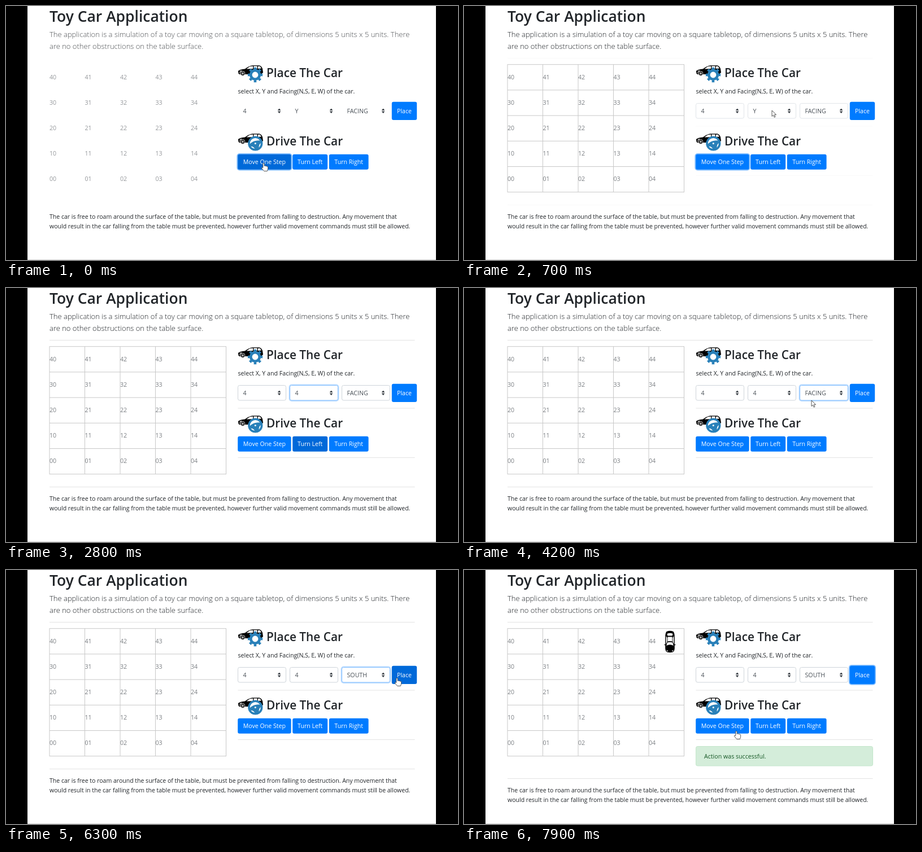
An HTML page for the animation above (8 s loop, 800x450 px).

```html
<!DOCTYPE html>
<html lang="en">
<head>
<meta charset="utf-8">
<title>Toy Car Application</title>
<style>
  html, body { margin: 0; width: 100%; height: 100%; overflow: hidden; background: #000; }
  svg { display: block; width: 800px; height: 450px; }
  text { font-family: "Open Sans", "Noto Sans", sans-serif; font-size: 10.65px; fill: #212529; white-space: pre; }
  .title { font-weight: 600; font-size: 26.45px; }
  .head { font-weight: 600; font-size: 20.8px; }
  .lead { font-weight: 300; font-size: 13px; }
  .note { font-size: 10.53px; }
  .cell { fill: #7b7f83; }
  .value { fill: #495057; }
  .label { fill: #fff; font-size: 10.6px; text-anchor: middle; }
  .rule { stroke: #e3e3e3; }
  .grid { stroke: #c8c8c8; fill: none; }
</style>
</head>
<body>
<svg id="stage" viewBox="0 0 800 450" xmlns="http://www.w3.org/2000/svg"></svg>
<script>
const LOOP = 8000, STEP = 100;
const BLUE = [0, 123, 255], DARK = [0, 105, 217];
const stage = document.getElementById('stage');
const $ = id => document.getElementById(id);

const text = (x, y, cls, str, id = '') =>
  `<text ${id && `id="${id}"`} class="${cls}" x="${x}" y="${y}">${str}</text>`;
const rule = (x, y) => `<path class="rule" d="M${x} ${y}H723.5"/>`;
const box = (x, y, w, h, attrs) =>
  `<rect x="${x}" y="${y}" width="${w}" height="${h}" ${attrs}/>`;

const button = (id, x, y, w, h, label) =>
  box(x - .8, y - .8, w + 1.6, h + 1.6, `id="${id}Ring" rx="4" fill="none" stroke="#80bdff" stroke-width="2"`) +
  box(x, y, w, h, `id="${id}" rx="3"`) +
  text(x + w / 2, y + h / 2 + 4, 'label', label);

const select = (id, x) =>
  box(x - 1, 171.5, 87, 28.5, `id="${id}Ring" rx="4" fill="none" stroke="#bfdeff" stroke-width="2"`) +
  box(x, 172.5, 85, 26.5, `id="${id}" rx="3" fill="#fff"`) +
  `<path fill="#343a40" d="M${x + 70.3} 185l2.8-3.6 2.8 3.6zM${x + 70.3} 186.6l2.8 3.6 2.8-3.6z"/>` +
  text(x + 9, 190, 'value', '', id + 'Value');

function table() {
  const left = 77, top = 103.7, colW = 62.5, rowH = 45.2;
  let lines = '', cells = '';
  for (let i = 1; i < 5; i++)
    lines += `M${left + i * colW} ${top}v${5 * rowH}M${left} ${top + i * rowH}h${5 * colW}`;
  for (let row = 0; row < 5; row++)
    for (let col = 0; col < 5; col++)
      cells += text(left + col * colW, 129.5 + row * rowH, 'cell', `${4 - row}${col}`);
  return `<g id="lines" class="grid">${box(left, top, 5 * colW, 5 * rowH, '')}<path d="${lines}"/></g><g id="cells">${cells}</g>`;
}

const sideCar = y => `<g transform="translate(411 ${y})">
  <path d="M0 10Q3 7.2 12 6.500Q19 1 25 .3H37Q41 .8 43 6L44 13L40 16H3Q0 15.500 0 13Z"/>
  <path fill="#fff" d="M14.500 6.600L20.500 2.300L26 1.600V6.300ZM27.300 1.600H33.700V6L27.300 6.300ZM35 1.700H38.500L41 5.600L35 6ZM2 10.200l5-1.200-2.500 2.400zM.8 12.800h3.500v.8H.8z"/>
  <circle cx="8" cy="14.500" r="3.900" stroke="#fff" stroke-width=".8"/><circle cx="8" cy="14.500" r="2" fill="#aaa"/></g>`;

const gear = `<g transform="translate(441 122)" fill="none" stroke="#2980b9">
  <circle r="10" fill="#fff" stroke="none"/>
  <circle r="11.200" stroke-width="4" pathLength="16" stroke-dasharray="1" transform="rotate(-11)"/>
  <circle r="7.800" stroke-width="4.800"/></g>`;

const wheel = `<g transform="translate(441.300 243.500)" fill="none" stroke="#2980b9">
  <circle r="11.300" fill="#fff" stroke-width="3.600"/>
  <path fill="#2980b9" stroke="none" transform="rotate(-18)" d="M-10-2Q0-7 10-2V2.500Q5 3 3.500 10H-3.500Q-5 3-10 2.500Z"/>
  <circle r="1.500" fill="#fff" stroke="none"/></g>`;

const topCar = `<g id="car" transform="translate(364.500 127)">
  <path d="M-6-18Q0-20.500 6-18Q8.500-15 8.300-7V12Q8 17 5 18.500Q0 20-5 18.500Q-8 17-8.300 12V-7Q-8.500-15-6-18Z"/>
  <path d="M-8 4l-2.500 1.800 2.500.6zM8 4l2.500 1.800-2.500.6z"/>
  <path fill="#fff" d="M-5-14Q0-16.500 5-14L4.200-10.500H-4.200ZM-6.300 7Q0 3.500 6.300 7L4.600 1.500Q0 0-4.600 1.500ZM-6.900-10l2 3V0l-2 4.500zM6.900-10l-2 3V0l2 4.500zM-4-8.500H4V-.5Q0-1.500-4-.5ZM-6 14.500l3 2.500h-2.500zM6 14.500l-3 2.500h2.500z"/></g>`;

const cursors = `<g fill="#fff" stroke="#444" stroke-width=".9" stroke-linejoin="round">
  <path id="arrow" d="M0 0V10.500L2.500 8.300L4.200 12.200L6 11.400L4.300 7.700H7.600Z"/>
  <path id="hand" d="M-1.200 8.500V1Q0-.8 1.200 1V5.300Q2.500 4.300 3.500 5.700Q4.900 4.900 5.700 6.200Q7.500 5.800 7.600 7.500V10.500L6.400 14.500H.6L-3.600 9.300Q-3.500 7-1.200 8.500Z"/></g>`;

stage.innerHTML =
  box(0, 0, 800, 450, 'fill="#000"') + box(38, 0, 723, 450, 'fill="#fff"') +
  box(38, 449, 723, 1, 'fill="#d8d8d8"') +
  text(77, 28, 'title', 'Toy Car Application') +
  `<g id="lead">` +
  text(77, 55, 'lead', 'The application is a simulation of a toy car moving on a square tabletop, of dimensions 5 units x 5 units. There') +
  text(77, 76, 'lead', 'are no other obstructions on the table surface.') + '</g>' +
  `<g id="rules">${rule(77, 92.5)}${rule(410.5, 213)}${rule(410.5, 300.5)}</g>` +
  table() + topCar +
  sideCar(105) + gear + text(461, 126, 'head', 'Place The Car') +
  text(410.5, 154.5, '', 'select X, Y and Facing(N,S, E, W) of the car.') +
  select('x', 410.5) + select('y', 502.5) + select('facing', 594.5) +
  button('place', 682.8, 169.7, 44.4, 32.3, 'Place') +
  sideCar(226) + wheel + text(461, 247, 'head', 'Drive The Car') +
  button('move', 410.2, 262.8, 94.4, 26.9, 'Move One Step') +
  button('left', 507.2, 262.8, 62, 26.9, 'Turn Left') +
  button('right', 571.8, 262.8, 69.8, 26.9, 'Turn Right') +
  `<g id="alert">${box(410.5, 312.5, 313, 34.5, 'rx="3" fill="#d4edda" stroke="#c3e6cb"')}` +
  `<text x="425" y="334" style="fill:#155724">Action was successful.</text></g>` +
  `<g id="footer"><g id="footRule">${rule(77, 352.5)}</g>` +
  text(77, 377, 'note', 'The car is free to roam around the surface of the table, but must be prevented from falling to destruction. Any movement that') +
  text(77, 394, 'note', 'would result in the car falling from the table must be prevented, however further valid movement commands must still be allowed.') +
  '</g>' + cursors;

// Pointer track: time, x, y, shape from that time on.
const track = [
  [0, 456, 278, 'hand'], [100, 456, 278, 'hand'], [200, 466, 261, 'arrow'],
  [600, 545, 185, 'arrow'], [1000, 545, 185, 'arrow'], [1100, 542, 200, 'arrow'],
  [2399, 542, 200, 'arrow'], [2400, 542, 200, ''],
  [2900, 550, 258, 'arrow'], [3200, 615, 188, 'arrow'], [3600, 615, 188, 'arrow'],
  [3700, 615, 199, 'arrow'], [5599, 615, 199, 'arrow'],
  [5600, 622, 228, 'arrow'], [5900, 680, 203, 'arrow'], [6000, 687, 196, 'hand'],
  [6200, 692, 191, 'hand'], [7400, 692, 191, 'hand'], [7500, 672, 206, 'arrow'],
  [7800, 500, 272, 'hand'], [7900, 482, 285, 'hand'], [LOOP, 482, 285, 'hand']
];

const clamp = v => Math.max(0, Math.min(1, v));
const ramp = (t, from, to) => clamp((t - from) / (to - from));
const lerp = (a, b, k) => a + (b - a) * k;
const during = (t, from, to) => t >= from && t < to;
const show = (id, on) => $(id).setAttribute('visibility', on ? 'visible' : 'hidden');
const fade = (id, v) => $(id).setAttribute('opacity', v);

function paintButton(id, hover, focused) {
  const color = BLUE.map((c, i) => Math.round(lerp(c, DARK[i], hover)));
  $(id).setAttribute('fill', `rgb(${color})`);
  show(id + 'Ring', focused);
}

function paintSelect(id, value, focused, clarity) {
  $(id + 'Value').textContent = value;
  $(id).setAttribute('stroke', focused ? '#80bdff' : '#ced4da');
  $(id).setAttribute('stroke-opacity', focused ? 1 : clarity);
  show(id + 'Ring', focused);
}

function paintPointer(t) {
  const next = track.findIndex(key => key[0] > t);
  const [t0, x0, y0, shape] = track[next - 1];
  const [t1, x1, y1] = track[next];
  const k = ramp(t, t0, t1);
  for (const id of ['arrow', 'hand']) {
    show(id, id === shape);
    $(id).setAttribute('transform', `translate(${lerp(x0, x1, k)} ${lerp(y0, y1, k)})`);
  }
}

function render(time) {
  const t = Math.floor((time % LOOP) / STEP) * STEP;
  const settle = ramp(t, 0, 600);
  const placed = t >= 6600;

  fade('lines', settle);
  fade('cells', lerp(.8, 1, settle));
  fade('lead', lerp(.8, 1, settle));
  const ruleClarity = t < 700 ? .2 * settle : lerp(.2, 1, ramp(t, 700, 2600));
  fade('rules', ruleClarity);
  fade('footRule', ruleClarity);

  const clarity = t < 700 ? .6 * settle : lerp(.6, 1, ramp(t, 700, 1500));
  paintSelect('x', '4', false, clarity);
  paintSelect('y', t < 2400 ? 'Y' : '4', during(t, 900, 3500), clarity);
  paintSelect('facing', t < 5600 ? 'FACING' : 'SOUTH', during(t, 3500, 6500), clarity);

  paintButton('place', ramp(t, 5900, 6100) * (1 - ramp(t, 7400, 7600)), t >= 6500);
  paintButton('move', 1 - ramp(t, 100, 300), t < 900);
  paintButton('left', ramp(t, 2300, 2500) * (1 - ramp(t, 2900, 3100)), false);
  paintButton('right', 0, false);

  show('car', placed);
  show('alert', placed);
  $('footer').setAttribute('transform', `translate(0 ${placed ? 17 : 0})`);
  paintPointer(t);
}

const start = performance.now();
function tick() {
  render(performance.now() - start);
  requestAnimationFrame(tick);
}
tick();
</script>
</body>
</html>
```
